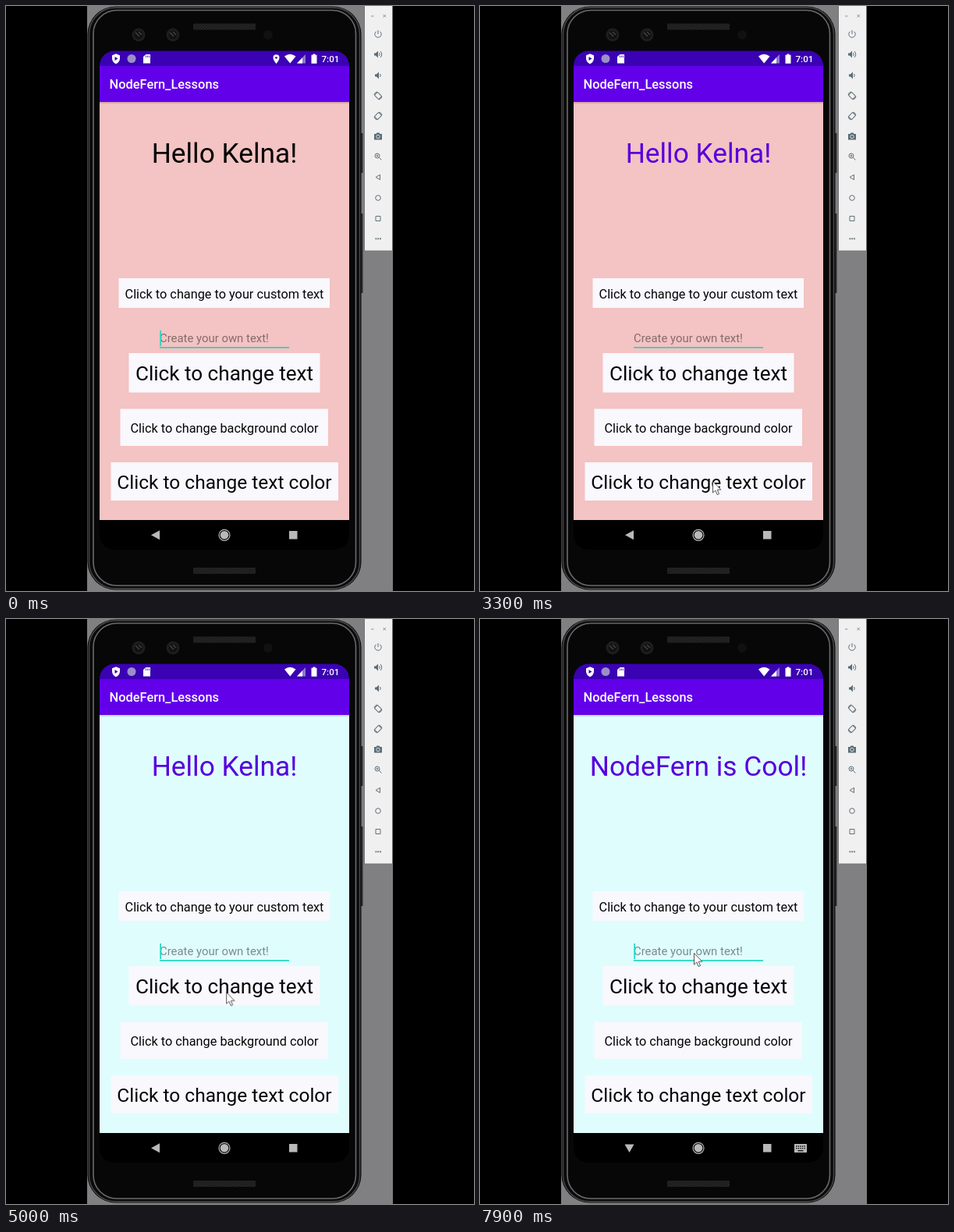
An HTML page for the animation above (8 s loop, 600x750 px).

```html
<!DOCTYPE html>
<html lang="en">
<head>
<meta charset="utf-8">
<title>Phone demo</title>
<style>
  html, body { margin: 0; width: 100%; height: 100%; overflow: hidden; background: #000; }
  svg { display: block; width: 100%; height: 100%; }
  text { font-family: Roboto, "Open Sans", sans-serif; }
  .mid { text-anchor: middle; }
  .label { text-anchor: middle; fill: #050506; }
  .bold { font-weight: 500; fill: #fff; }
  .btn { fill: #f9f8fd; }
  .line { fill: none; stroke: #5f7079; stroke-width: 1; }
  .solid { fill: #5a6c75; }
  .nav { fill: #b9b9b9; }

  /* slight lead keeps hard changes clear of the tenth-second marks */
  .anim { animation: 8s step-end -.03s infinite; }
  #backdrop { animation-name: backdrop; }
  #heading { animation-name: ink; }
  #caret { animation-name: blink; }
  #pin { animation-name: pin; }
  .early { animation-name: early; }
  .late { animation-name: late; }
  .idle { animation-name: idle; }
  .typing { animation-name: typing; }
  #mouse { animation: move 8s linear -.03s infinite; }
  #arrow { animation-name: arrow; }

  @keyframes backdrop { 0% { fill: #f4c3c3 } 50%, 100% { fill: #e0fdfe } }
  @keyframes ink { 0% { fill: #050505 } 31.25%, 100% { fill: #5502dc } }
  @keyframes pin { 0% { opacity: 1 } 25%, 100% { opacity: 0 } }
  @keyframes early { 0% { opacity: 1 } 81.25%, 100% { opacity: 0 } }
  @keyframes late { 0% { opacity: 0 } 81.25%, 100% { opacity: 1 } }
  @keyframes idle { 0% { opacity: 1 } 93.75%, 100% { opacity: 0 } }
  @keyframes typing { 0% { opacity: 0 } 93.75%, 100% { opacity: 1 } }
  @keyframes arrow { 0% { opacity: 0 } 21.25%, 100% { opacity: 1 } }
  @keyframes blink {
    0%, 7.5%, 20%, 32.5%, 45%, 57.5%, 70%, 83.75%, 93.75%, 100% { opacity: 1 }
    1.25%, 13.75%, 26.25%, 38.75%, 51.25%, 63.75%, 76.25%, 90% { opacity: 0 }
  }
  @keyframes move {
    0%, 21.25% { transform: translate(326px, 615px) }
    27.5%, 42.5% { transform: translate(298px, 609px) }
    48.75%, 56.25% { transform: translate(283px, 530px) }
    60%, 61.25% { transform: translate(283px, 514px) }
    65%, 75.5% { transform: translate(281px, 432px) }
    78.75%, 85% { transform: translate(281px, 479px) }
    87.5%, 100% { transform: translate(274px, 428px) }
  }
</style>
</head>
<body>
<svg viewBox="0 0 600 750">
  <defs>
    <linearGradient id="shade" x2="0" y2="1">
      <stop stop-color="#000" stop-opacity=".2"/>
      <stop offset="1" stop-color="#000" stop-opacity="0"/>
    </linearGradient>
    <pattern id="mesh" width="4" height="4" patternUnits="userSpaceOnUse">
      <rect width="4" height="4" fill="#1d1d1e"/>
      <path d="M0 4L4 0" stroke="#2b2b2c"/>
    </pattern>
    <clipPath id="screen"><rect x="120" y="57.500" width="320" height="639.500" rx="19"/></clipPath>
    <g id="lens">
      <circle r="8.500" fill="#1e1e1f"/>
      <circle r="5.500" fill="#111112"/>
      <path d="M-4 -3L1 2M0 -4L4 0" stroke="#414143" stroke-width="1.500"/>
    </g>
    <g id="turn" class="line">
      <rect x="-2.800" y="-3.800" width="5.600" height="7.600" rx=".5" transform="rotate(-45)"/>
      <path d="M-5 -1A5 5 0 0 1 -1 -5M5 1A5 5 0 0 1 1 5"/>
    </g>
  </defs>

  <rect width="600" height="750"/>
  <rect x="104" width="392" height="750" fill="#808082"/>

  <!-- phone shell -->
  <path d="M455 163h2.500v51h-2.500zM455 266h2.500v102h-2.500z" fill="#2c2c2e"/>
  <rect x="104.500" y=".5" width="351" height="748" rx="36" fill="#0b0b0c"/>
  <rect x="106.500" y="2" width="347" height="745" rx="34" fill="none" stroke="#4c4c4e" stroke-width="1.300"/>
  <rect x="112" y="5.500" width="336.500" height="737.500" rx="30" fill="#070708" stroke="#6a6a6c" stroke-width="1.600"/>
  <rect x="240" y="22.500" width="80" height="8" rx="1" fill="url(#mesh)"/>
  <rect x="240" y="720" width="80" height="8" rx="1" fill="url(#mesh)"/>
  <use href="#lens" x="170" y="37"/>
  <use href="#lens" x="214" y="37"/>
  <circle cx="336" cy="37" r="6" fill="#111112"/>

  <!-- emulator toolbar -->
  <rect x="459.500" y="-1" width="36" height="315" fill="#f1f0f1" stroke="#747476"/>
  <path d="M468 13h3.500M483.500 11l3.500 3.500m0-3.500l-3.500 3.500" stroke="#77777a" stroke-width=".8"/>
  <g transform="translate(477 36)" class="line"><path d="M-2.500 -3.300A4.200 4.200 0 1 0 2.500 -3.300M0 -5V0"/></g>
  <g transform="translate(477 62)"><path class="solid" d="M-5 -1.500h2l3-3v9l-3-3h-2z"/><path class="line" d="M1.500 -2q1.500 2 0 4M3 -4q3.500 4 0 8"/></g>
  <g transform="translate(477 89)"><path class="solid" d="M-4 -1.500h2l3-3v9l-3-3h-2z"/><path class="line" d="M2.500 -2q1.500 2 0 4"/></g>
  <use href="#turn" x="477" y="115"/>
  <use href="#turn" transform="translate(477 141) scale(-1 1)"/>
  <g transform="translate(477 167)"><path class="solid" d="M-5 -3h2.500l1-1.500h3l1 1.500H5v7.500H-5z"/><circle r="2.200" cy=".5" fill="#5a6c75" stroke="#e8eaeb" stroke-width=".9"/></g>
  <g transform="translate(477 193)" class="line"><circle cx="-1" cy="-1" r="3"/><path d="M1.300 1.300L4.500 4.500M-2.500 -1h3M-1 -2.500v3"/></g>
  <path class="line" d="M474 219.500l5.500-3.200v6.400zM474 269.500h6v6h-6z"/>
  <circle class="line" cx="477" cy="246" r="3.300"/>
  <path class="solid" d="M473.500 297.500h1.800v1.800h-1.800zM476.300 297.500h1.800v1.800h-1.800zM479.100 297.500h1.800v1.800h-1.800z"/>

  <g clip-path="url(#screen)">
    <rect x="120" y="57" width="320" height="640"/>
    <rect id="backdrop" class="anim" x="120" y="123" width="320" height="536" fill="#f4c3c3"/>
    <rect x="120" y="123" width="320" height="3" fill="url(#shade)"/>
    <rect x="120" y="57" width="320" height="20.500" fill="#3a02b3"/>
    <rect x="120" y="77" width="320" height="46" fill="#6200ea"/>

    <!-- status bar -->
    <path d="M141 61.300l5 2v4q0 4.500-5 7q-5-2.500-5-7v-4z" fill="#fff"/>
    <path d="M139.500 65v5l4-2.500z" fill="#3a02b3"/>
    <circle cx="161" cy="67.500" r="5.500" fill="#9b8fc8"/>
    <path d="M179.500 62h5.500v11.500h-9v-8.500z" fill="#fff"/>
    <path d="M179.500 63.500v2.500M181.500 63.500v2.500M183.500 63.500v2.500" stroke="#3a02b3" stroke-width=".8"/>
    <g id="pin" class="anim">
      <path d="M346.500 62.300a4 4 0 0 1 4 4q0 3-4 7.700q-4-4.700-4-7.700a4 4 0 0 1 4-4z" fill="#fff"/>
      <circle cx="346.500" cy="66.300" r="1.400" fill="#3a02b3"/>
    </g>
    <path d="M357 64.500q7-5.500 14.500 0L364.200 73.500z" fill="#fff"/>
    <path d="M384 62v11.500h-11z" fill="#8f78d2"/>
    <path d="M380 66.200v7.300h-7z" fill="#fff"/>
    <path d="M393.500 61.500h3v1.300h2v11h-7v-11h2z" fill="#fff"/>
    <text class="bold" x="404.500" y="72" font-size="11.600">7:01</text>

    <text class="bold" x="132.500" y="106.200" font-size="16.400">NodeFern_Lessons</text>

    <g id="heading" class="anim mid" font-size="35.300">
      <text class="anim early" x="280" y="200.600">Hello Kelna!</text>
      <text class="anim late" x="280" y="200.600">NodeFern is Cool!</text>
    </g>

    <rect class="btn" x="144.500" y="349" width="270.500" height="38"/>
    <rect class="btn" x="157.500" y="445" width="245" height="50.500"/>
    <rect class="btn" x="146.500" y="516.500" width="266.500" height="47.500"/>
    <rect class="btn" x="134.500" y="585" width="291.500" height="49"/>
    <text class="label" x="280" y="374.700" font-size="16.300">Click to change to your custom text</text>
    <text class="label" x="280" y="480" font-size="26.100">Click to change text</text>
    <text class="label" x="280" y="546.900" font-size="16.300">Click to change background color</text>
    <text class="label" x="280" y="619" font-size="24.500">Click to change text color</text>

    <text x="197" y="431.200" font-size="14.900" fill="#000" fill-opacity=".45">Create your own text!</text>
    <rect x="197" y="437" width="166" height="1.700" fill="#25d5c0"/>
    <rect id="caret" class="anim" x="197.300" y="416" width="1.700" height="20" fill="#25d5c0"/>

    <!-- navigation bar -->
    <path class="nav anim idle" d="M186 678.300l11-6v12z"/>
    <g class="nav anim typing">
      <path d="M185.500 673.500h12l-6 10.500z"/>
      <path d="M403 673h16v11h-16z"/>
      <path d="M405 676h12M405 678.700h12" stroke="#000" stroke-width="1.300" stroke-dasharray="1.400 1.200"/>
      <path d="M407.500 681.700h7" stroke="#000" stroke-width="1.200"/>
    </g>
    <circle class="nav" cx="280" cy="678.300" r="5.300"/>
    <circle cx="280" cy="678.300" r="7" fill="none" stroke="#b9b9b9" stroke-width="1.200"/>
    <rect class="nav" x="363" y="673" width="10.500" height="10.500"/>
  </g>

  <g id="mouse">
    <path id="arrow" class="anim" d="M.5 .5V15L3.800 12L6.200 17.500L8.500 16.500L6.200 11.200H10.800z" fill="#fff" stroke="#444" stroke-width=".9"/>
  </g>
</svg>
</body>
</html>
```
